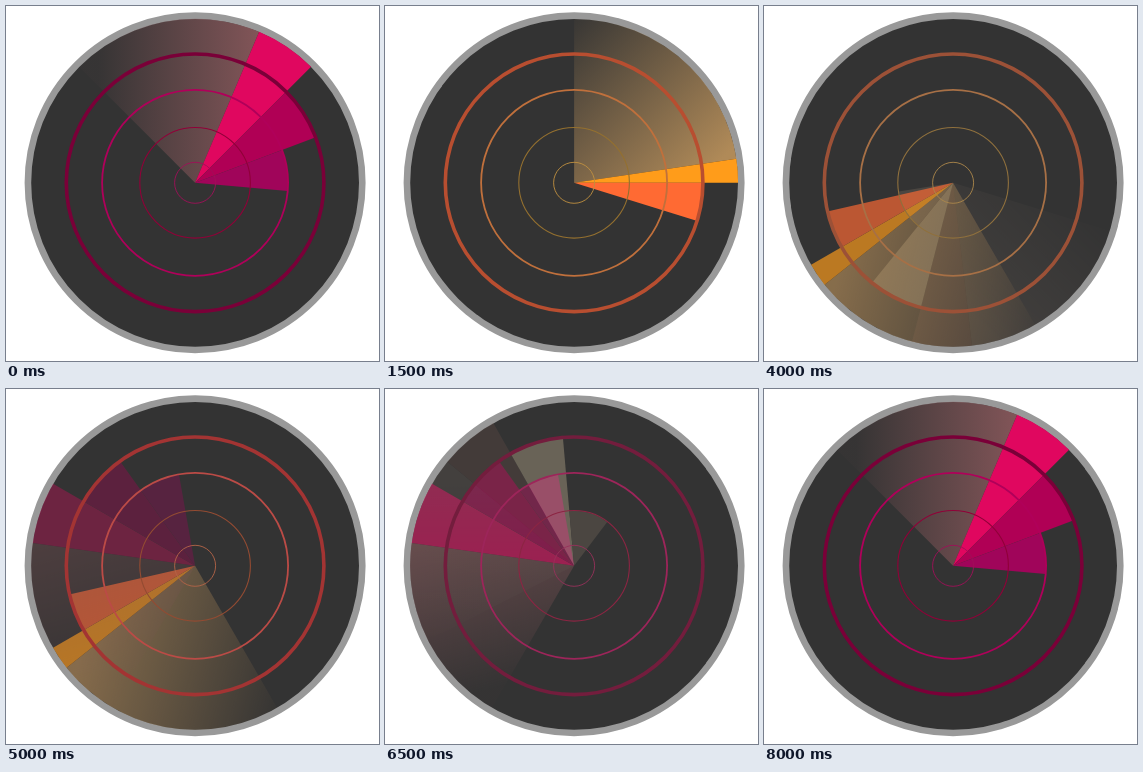
Write an HTML page that moves like this. It is 373 by 355 pixels and loops after 8.5 s.

```html
<!DOCTYPE html>
<html lang="en">
<head>
<meta charset="utf-8">
<title>Radar</title>
<style>
  html, body { margin: 0; width: 100%; height: 100%; overflow: hidden; background: #fff; }
  svg { display: block; width: 373px; height: 355px; }
</style>
</head>
<body>
<svg viewBox="0 0 373 355">
  <g id="radar" transform="translate(189.1 176.8)">
    <circle r="167.2" fill="#333" stroke="#999" stroke-width="6.6"/>
  </g>
</svg>
<script>
const STEP_MS = 500, SPACING = 3, R = 164;
const radar = document.getElementById('radar');

function add(parent, tag, attrs) {
  const el = document.createElementNS('http://www.w3.org/2000/svg', tag);
  for (const key in attrs) el.setAttribute(key, attrs[key]);
  return parent.appendChild(el);
}

// Angles are degrees clockwise from north.
function wedge(parent, radius, from, to, fill) {
  const point = deg => {
    const a = deg * Math.PI / 180;
    return `${radius * Math.sin(a)} ${-radius * Math.cos(a)}`;
  };
  add(parent, 'path', { d: `M0 0L${point(from)}A${radius} ${radius} 0 0 1 ${point(to)}Z`, fill });
}

function trail(id, color, [x1, y1, x2, y2]) {
  const grad = add(radar, 'linearGradient', { id, x1, y1, x2, y2, gradientUnits: 'userSpaceOnUse' });
  add(grad, 'stop', { offset: 0, 'stop-color': color, 'stop-opacity': 0.04 });
  add(grad, 'stop', { offset: 1, 'stop-color': color });
  return `url(#${id})`;
}

// Wedges follow one another from the start angle: radius, end angle, fill.
// Ring colours run from the outside in.
const pink = {
  start: -45,
  wedges: [
    [R, 23, trail('pinkTrail', '#825558', [-97, 0, 64, 0])],
    [R, 45, '#e0075f'],
    [129, 69.3, '#b00055'],
    [93, 95, '#a0055a']
  ],
  rings: ['#7a0038', '#b0005a', '#900038', '#a01058']
};
const orange = {
  start: 0,
  wedges: [
    [R, 81.6, trail('orangeTrail', '#b08a58', [0, -164, 144, -20])],
    [R, 90, '#ff9c1a'],
    [129, 107.2, '#ff6a33']
  ],
  rings: ['#b84e30', '#c0703c', '#94702f', '#c09040']
};
const tan = {
  start: 107,
  wedges: [
    [R, 173.4, trail('tanTrail', '#655c56', [135, 23, 20, 143])],
    [R, 194.5, '#634d47'],
    [129, 219, '#d6c49f'],
    [55, 261, '#7b6c5e']
  ],
  rings: ['#645746', '#76705a', '#857058', '#857560']
};

const scans = [[pink, 0], [orange, 0], [tan, 0], [orange, 150], [pink, 255], [tan, 136]]
  .map(([sweep, angle]) => {
    const el = add(radar, 'g', { transform: `rotate(${angle})` });
    let from = sweep.start;
    for (const [radius, to, fill] of sweep.wedges) {
      wedge(el, radius, from, to, fill);
      from = to;
    }
    return { el, colors: sweep.rings.map(rgb) };
  });

const rings = [[128.8, 3.6], [93, 1.8], [55.3, 1.1], [20.5, 0.9]]
  .map(([r, width]) => add(radar, 'circle', { r, fill: 'none', 'stroke-width': width }));

function rgb(hex) {
  return [1, 3, 5].map(i => parseInt(hex.slice(i, i + 2), 16));
}

// Neighbouring scans cross-fade; the last one cuts back to the first, which is held once more.
const lastStep = (scans.length - 1) * SPACING;

function draw(now) {
  const step = Math.floor(now / STEP_MS) % (lastStep + 2) % (lastStep + 1);
  const levels = scans.map((_, i) => Math.max(0, 1 - Math.abs(step / SPACING - i)));
  scans.forEach(({ el }, i) => el.setAttribute('opacity', levels[i]));
  rings.forEach((ring, n) => {
    const mix = [0, 1, 2].map(c =>
      Math.round(scans.reduce((sum, scan, i) => sum + levels[i] * scan.colors[n][c], 0)));
    ring.setAttribute('stroke', `rgb(${mix})`);
  });
}

const start = performance.now();
function tick() {
  draw(performance.now() - start);
  requestAnimationFrame(tick);
}
tick();
</script>
</body>
</html>
```
